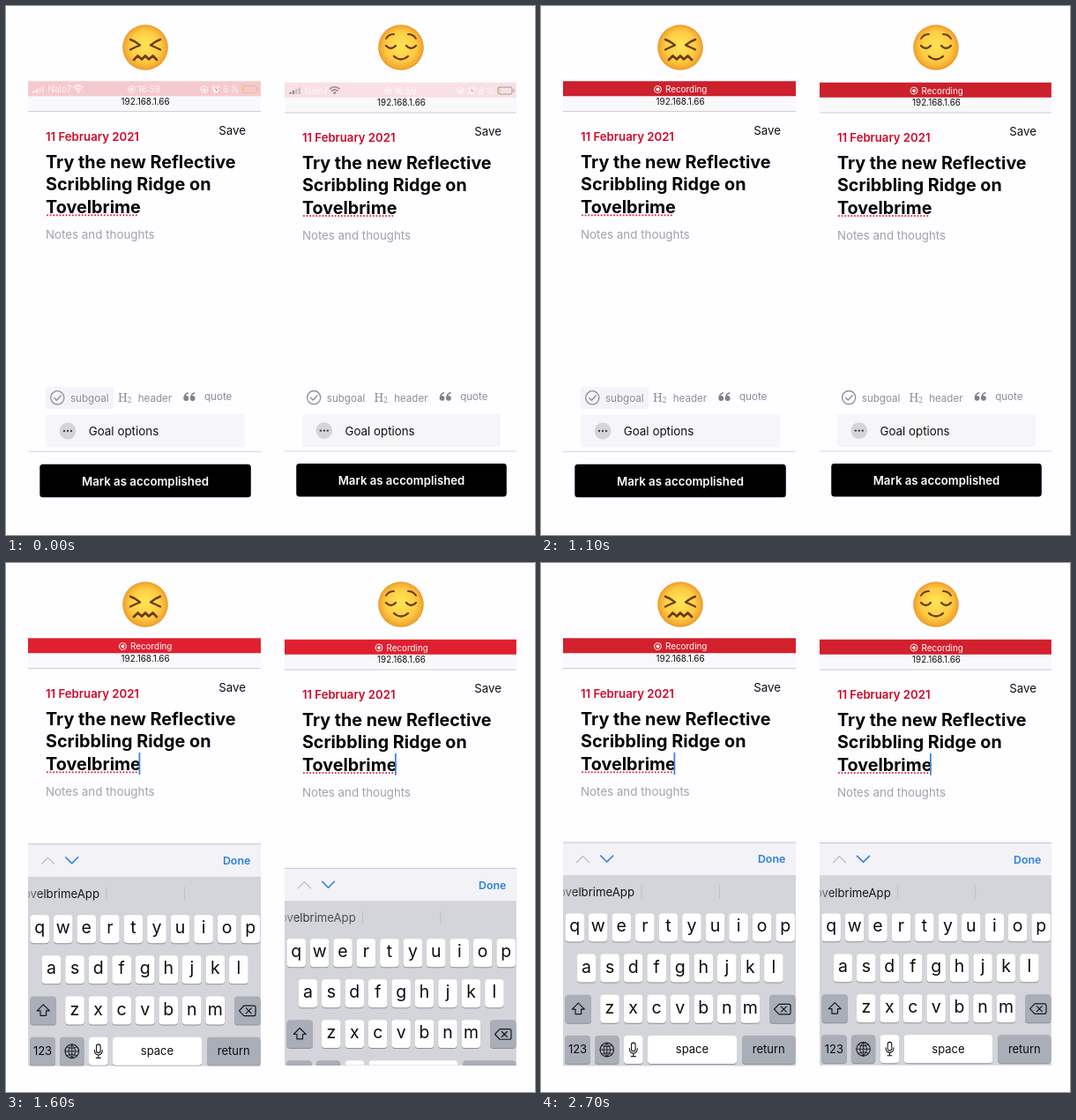
Animation, 600 px wide and 600 px high, one loop 2.8 s. Source, as an HTML page with a canvas:

```html
<!DOCTYPE html>
<html lang="en">
<head>
<meta charset="utf-8">
<title>Keyboard comparison</title>
<style>
  html, body { margin: 0; width: 100%; height: 100%; overflow: hidden; background: #fefdff; }
  canvas { display: block; }
</style>
</head>
<body>
<canvas id="stage" width="600" height="600"></canvas>
<script>
const ctx = document.getElementById('stage').getContext('2d');
const LOOP = 2800, STEP = 100;
const BLUE = '#2b7fe0', GREY = '#8e8d91', RAISE = 254;
const clamp = v => Math.max(0, Math.min(1, v));

function box(x, y, w, h, color, r = 0) {
  ctx.fillStyle = color;
  ctx.beginPath();
  ctx.roundRect(x, y, w, h, r);
  ctx.fill();
}

function dot(x, y, r, color) {
  ctx.fillStyle = color;
  ctx.beginPath();
  ctx.arc(x, y, r, 0, 7);
  ctx.fill();
}

function stroke(path, color, width = 1) {
  ctx.strokeStyle = color;
  ctx.lineWidth = width;
  ctx.stroke(new Path2D(path));
}

function ring(x, y, r, color, width = 1) {
  stroke(`M${x - r} ${y}a${r} ${r} 0 1 1 ${2 * r} 0a${r} ${r} 0 1 1 ${-2 * r} 0`, color, width);
}

// y is the middle of the capitals
function text(str, x, y, size, color, weight = 400, align = 'left', family = 'Inter, sans-serif') {
  ctx.font = `${weight} ${size}px ${family}`;
  ctx.textAlign = align;
  ctx.fillStyle = color;
  ctx.fillText(str, x, y + size * 0.36);
}

function face(x, y, lines) {
  const skin = ctx.createRadialGradient(x, y - 3, 4, x, y, 26);
  skin.addColorStop(0, '#ffe052');
  skin.addColorStop(0.6, '#fdcb43');
  skin.addColorStop(0.9, '#f3a930');
  skin.addColorStop(1, '#e79528');
  dot(x, y, 25.8, skin);
  ctx.save();
  ctx.translate(x, y);
  for (const [path, width] of lines) stroke(path, '#6b3c12', width);
  ctx.restore();
}

function faces() {
  face(158, 47, [
    ['M-17-9Q-11-7-6-2.500Q-11-.5-17 2.500M17-9Q11-7 6-2.500Q11-.5 17 2.500', 2.4],
    ['M-13 14L-8.500 9.500L-4 13.500L0 9.500L4 13.500L8.500 9.500L13 14', 2.7]
  ]);
  face(448, 47, [
    ['M-17-2q5.500 6 11 0M6-2q5.500 6 11 0', 2.3],
    ['M-17-10q3-5 9-5M17-10q-3-5-9-5', 1.8],
    ['M-8 10q8 7 16 0', 2.3]
  ]);
}

function recordIcon(x) {
  ring(x, 94.5, 3.9, '#fff');
  dot(x, 94.5, 1.9, '#fff');
}

function signal(ink, alpha) {
  for (let i = 0; i < 4; i++) {
    ctx.globalAlpha = alpha * (i < 2 ? 1 : 0.45);
    box(30.5 + i * 3.4, 96 - i * 1.7, 2.4, 2.5 + i * 1.7, ink, 0.5);
  }
}

function statusBar(t, right) {
  const pulse = Math.cos((t - 350) / 1400 * 2 * Math.PI);
  const swap = clamp((t - 500) / 200);
  ctx.globalAlpha = clamp((right ? 0.13 : 0.23) + t / 340);
  box(25, 85.3, 264, 16.9, `rgb(${215 + 11 * pulse}, 32, ${46 + 2 * pulse})`);

  const ink = right && t < 200 ? '#77757a' : '#fff';
  const shown = (1 - swap) * (t < 200 ? 0.75 : 1);
  signal(ink, shown);
  ctx.globalAlpha = shown;
  stroke('M76.7 92.3q5.3-4.3 10.6 0M78.8 94.7q3.2-2.7 6.4 0', ink, 1.6);
  dot(82, 97, 1.5, ink);
  stroke('M270 90.5h12q2 0 2 2v4q0 2-2 2h-12q-2 0-2-2v-4q0-2 2-2M286 93v3', ink == '#fff' ? '#f3ae78' : ink, 0.9);
  box(269.3, 92, 1.5, 5, '#f7c45c');
  text('Nalo7', 47.5, 94.5, 9.9, '#fff');
  recordIcon(142.5);
  text('16:59', 149.5, 94.5, 9.9, '#fff', 500);
  ring(225, 94.5, 3.7, '#fff');
  box(223.4, 93.8, 3.2, 2.6, '#fff');
  dot(238, 95, 3.4, '#fff');
  stroke('M234 92l2-1.5M242 92l-2-1.5', '#fff', 1.5);
  stroke('M238 93v2.3h1.7', '#d42030', 0.8);
  text('6 %', 246, 94.5, 9.9, '#fff');

  ctx.globalAlpha = swap;
  recordIcon(132.5);
  text('Recording', 141, 94.5, 9.9, '#fff');
  ctx.globalAlpha = 1;
}

function page(focused, highlight) {
  box(25, 102, 264, 17.5, '#f9f8fa');
  box(25, 119, 264, 1, '#cfced2');
  text('192.168.1.66', 158, 108.3, 9.9, '#111', 400, 'center');
  text('Save', 272, 141, 13.3, '#111', 400, 'right');
  text('11 February 2021', 45, 148.3, 13.2, '#cf0a27', 600);
  ['Try the new Reflective', 'Scribbling Ridge on', 'Tovelbrime'].forEach((line, i) =>
    text(line, 45, 176.6 + i * 25.6, 19.8, '#050505', 700));
  ctx.setLineDash([0, 3.6]);
  stroke('M47 237.3H151', '#d93a50', 2.2);
  ctx.setLineDash([]);
  if (focused) box(150.5, 215, 1.8, 25, '#3d87d6');
  text('Notes and thoughts', 45, 259.5, 13.35, '#a3a2a6');

  if (highlight) box(45, 432, 77, 25, '#f4f3f5', 3);
  ring(58.3, 444.3, 7.6, GREY, 1.3);
  stroke('M54.7 444.5l2.7 2.7l4.8-5.2', GREY, 1.3);
  text('subgoal', 73, 444.7, 11.6, GREY);
  text('H', 127, 444.3, 13.6, GREY, 400, 'left', '"Noto Serif", serif');
  text('2', 137.8, 447, 8.5, GREY, 400, 'left', '"Noto Serif", serif');
  text('header', 149.7, 444.7, 11.6, GREY);
  for (const x of [204.3, 211.7]) {
    dot(x, 445, 2.9, '#838286');
    stroke(`M${x - 2} 445q-.3-4.5 4-6`, '#838286', 1.6);
  }
  text('quote', 225, 443.3, 11.6, GREY);

  box(45, 463.5, 226, 37, '#f6f5f7', 3);
  dot(70, 482, 9.4, '#d5d4d7');
  for (const dx of [-4, 0, 4]) dot(70 + dx, 482, 1.2, '#454448');
  text('Goal options', 93.7, 482.5, 13.4, '#111');

  box(25, 505, 264, 1, '#d9d8dc');
  box(38.3, 519.7, 239.5, 37.5, '#000', 3.5);
  text('Mark as accomplished', 158, 539, 13.25, '#fff', 600, 'center');
}

function key(x, y, w, label, color = '#fff', size = 13) {
  box(x, y + 1, w, 32, '#8d9097', 3.8);
  box(x, y, w, 32, color, 3.8);
  ctx.font = `400 ${size}px Inter, sans-serif`;
  ctx.textAlign = 'center';
  ctx.fillStyle = '#0c0c0e';
  ctx.fillText(label, x + w / 2, y + (size > 15 ? 21 : 20.3));
}

function suggestion(reveal) {
  const fade = ctx.createLinearGradient(25, 0, 107, 0);
  const ink = alpha => `rgba(20, 20, 24, ${alpha})`;
  fade.addColorStop(0, ink(0.35 * reveal));
  fade.addColorStop(0.2, ink(reveal));
  fade.addColorStop(0.6, ink(clamp(reveal * 2 - 1)));
  text('TovelbrimeApp', 106, 373.7, 13.2, fade, 400, 'right');
}

function keyboard(rest) {
  const dark = '#a9aeb8', ink = '#17181b';
  ctx.save();
  ctx.translate(0, rest * RAISE);
  box(25, 317, 264, 300, '#d3d5da');
  box(25, 317, 264, 37, '#f3f2f6');
  box(25, 316.5, 264, 1, '#c6c5ca');
  stroke('M40.5 339.5l7-7l7 7', '#c3c3c8', 1.4);
  stroke('M67.7 332l7 7l7-7', BLUE, 1.6);
  text('Done', 277.3, 336, 12.4, BLUE, 600, 'right');
  suggestion((1 - rest) ** 1.4);
  for (const x of [113.5, 202]) box(x, 365.5, 1, 15, '#bfc2c8');

  ctx.translate(0, 0.6);
  [['qwertyuiop', 38.2], ['asdfghjkl', 51.5], ['zxcvbnm', 78]].forEach(([letters, x], row) =>
    [...letters].forEach((c, i) =>
      key(x + i * 26.55 - 10.8, 396.8 + row * 46.2, 21.6, c, '#fff', 19.5)));

  key(27.5, 489.2, 29.5, '', dark);
  stroke('M42.3 498.5l7 7h-3.7v5.5h-6.6v-5.5h-3.7z', ink, 1.2);
  key(259, 489.2, 29.5, '', dark);
  stroke('M264.5 505.5l5.5-5.8h11q2 0 2 2v7.6q0 2-2 2h-11zM272.3 502.5l6 6M278.3 502.5l-6 6', ink, 1.2);

  const y = 535.4;
  key(27, y, 29, '123', dark);
  key(61, y, 27.5, '', dark);
  ring(74.8, 551.5, 7.8, ink, 1.1);
  stroke('M67 551.5h15.6M74.8 543.7v15.6M74.8 543.7q-8 7.8 0 15.6q8-7.8 0-15.6M69 546.5q5.8 3 11.6 0M69 556.5q5.8-3 11.6 0', ink, 0.9);
  key(94, y, 21.6, '');
  stroke('M104.8 543.5a2.3 2.3 0 0 1 2.3 2.3v5a2.3 2.3 0 0 1-4.6 0v-5a2.3 2.3 0 0 1 2.3-2.3M100.3 550q0 5.5 4.5 5.5t4.5-5.5M104.8 555.5v3.5M102.3 559h5', ink, 1.1);
  key(121, y, 101, 'space');
  key(228, y, 60.5, 'return', dark);
  ctx.restore();
}

function panel(t, right) {
  const start = right ? 1414 : 1246;
  const focused = t >= start;
  ctx.save();
  if (right) ctx.setTransform(0.996, 0, 0, 0.995, 291.1, 2);
  ctx.beginPath();
  ctx.rect(25, 80, 264, 490.5);
  ctx.clip();
  page(focused, !right && !focused);
  statusBar(t, right);
  if (focused) {
    // critically damped spring
    const s = (t - start) * 0.02;
    keyboard((1 + s) * Math.exp(-s));
  }
  ctx.restore();
}

function draw() {
  const t = Math.floor(performance.now() % LOOP / STEP) * STEP;
  ctx.fillStyle = '#fefdff';
  ctx.fillRect(0, 0, 600, 600);
  ctx.lineCap = ctx.lineJoin = 'round';
  faces();
  panel(t, false);
  panel(t, true);
  requestAnimationFrame(draw);
}
draw();
</script>
</body>
</html>
```
